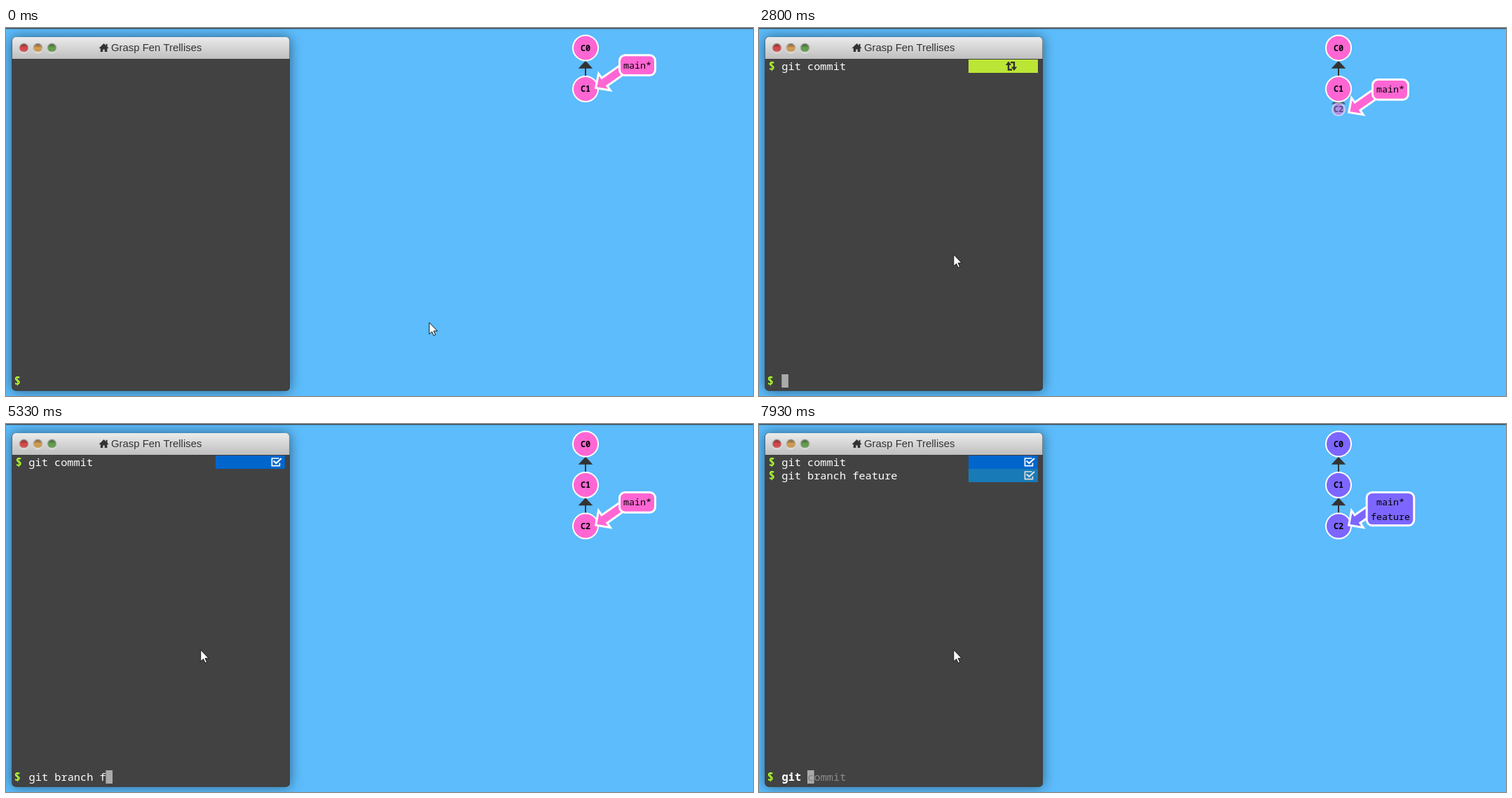
Animation, 1066 px wide and 525 px high, one loop 8 s. Source, as an HTML page with a canvas:

```html
<!DOCTYPE html>
<html lang="en">
<head>
<meta charset="utf-8">
<style>
html, body { margin: 0; width: 100%; height: 100%; overflow: hidden; background: #5cbcfc; }
canvas { display: block; }
</style>
</head>
<body>
<canvas id="stage" width="1066" height="525"></canvas>
<script>
const ctx = document.getElementById('stage').getContext('2d');
const LOOP = 8000, FPS = 15, CHAR = 9.18, SPACING = 58.6;
const MONO = '"Noto Sans Mono", monospace';
const DARK = [51, 51, 51], WHITE = [255, 255, 255], PINK = [255, 102, 211], PURPLE = [124, 102, 255];
const YELLOW = [235, 231, 40], GREEN = [149, 230, 64], BLUE = [0, 102, 204];

// Bursts of typing: text, time of first and last key
const commands = [
  { enter: 2200, start: 2570, done: 3500,
    bursts: [['git co', 1130, 1470], ['m', 1670], ['mit', 1870, 1930]] },
  { enter: 6470, start: 6840, done: 7490,
    bursts: [['git ', 3270, 3465], ['branch ', 4330, 5070], ['f', 5330], ['ea', 5470, 5470], ['ture', 5670, 5930]] },
  { enter: LOOP, bursts: [['git ', 7530, 7725]] },
];
const hints = ['git commit', 'git branch'];

const clamp = x => Math.max(0, Math.min(1, x));
const lerp = (a, b, p) => a + (b - a) * p;
const mix = (a, b, p) => a.map((v, i) => lerp(v, b[i], p));
const rgb = c => `rgb(${c.map(Math.round)})`;
const smooth = x => (x = clamp(x), x * x * (3 - 2 * x));
const ease = x => 1 - (1 - clamp(x)) ** 2.3;

// Each hop is a parabola centred on `mid`, touching the ground at 1
function bounce(x) {
  x = clamp(x) * 2.75;
  if (x < 1) return x * x;
  const [mid, half] = x < 2 ? [1.5, .5] : x < 2.5 ? [2.25, .25] : [2.625, .125];
  return 1 - half * half + (x - mid) ** 2;
}

function typedAt(t, bursts) {
  return bursts.map(([str, first, last]) =>
    [...str].filter((_, i) => t >= (i ? lerp(first, last, i / (str.length - 1)) : first)).join('')).join('');
}

function text(str, x, y, size, color, weight = 500, align = 'left', family = MONO) {
  ctx.font = `${weight} ${size}px ${family}`;
  ctx.fillStyle = color;
  ctx.textAlign = align;
  ctx.fillText(str, x, y);
}
function fill(color) {
  ctx.fillStyle = color;
  ctx.fill();
}
function stroke(color, width) {
  ctx.strokeStyle = color;
  ctx.lineWidth = width;
  ctx.stroke();
}
function path(...points) {
  ctx.beginPath();
  points.forEach(([x, y]) => ctx.lineTo(x, y));
}
function polygon(color, ...points) {
  path(...points);
  ctx.closePath();
  fill(color);
}
function box(x, y, w, h, r) {
  ctx.beginPath();
  ctx.roundRect(x, y, w, h, r);
}
function disc(x, y, r, color) {
  ctx.beginPath();
  ctx.arc(x, y, r, 0, 7);
  fill(color);
}
function rect(x, y, w, h, color) {
  ctx.fillStyle = color;
  ctx.fillRect(x, y, w, h);
}
function vertical(y0, y1, ...colors) {
  const g = ctx.createLinearGradient(0, y0, 0, y1);
  colors.forEach((c, i) => g.addColorStop(i / (colors.length - 1), c));
  return g;
}

function drawWindow() {
  rect(0, 0, 1066, 525, '#5cbcfc');
  rect(0, 0, 1066, 1.3, '#434a4f');
  ctx.save();
  ctx.shadowColor = 'rgba(0,0,0,.5)';
  ctx.shadowBlur = 17;
  box(8.5, 13, 396.5, 504.5, 5);
  fill('#424242');
  ctx.restore();
  box(9, 44, 395.5, 473, [0, 0, 5, 5]);
  stroke('#383838', 1);
  box(9, 13, 395.5, 31, [5, 5, 0, 0]);
  fill(vertical(13, 44, '#ebebeb', '#bfbfbf'));

  ['#e04b4c', '#dca355', '#69a551'].forEach((color, i) => {
    const x = 25.5 + 20 * i;
    disc(x, 29, 7.2, vertical(22, 36, '#858585', '#f0f0f0'));
    disc(x, 29, 5.8, color);
    disc(x, 29, 5.8, vertical(23, 35, 'rgba(0,0,0,.4)', 'rgba(0,0,0,0)', 'rgba(255,255,255,.5)'));
  });

  // House icon
  polygon('#333', [132.5, 29], [139.6, 22], [146.7, 29]);
  rect(142.6, 22.8, 2, 4, '#333');
  rect(134.8, 28, 9.6, 6, '#333');
  rect(138.3, 30.5, 2.5, 3.5, '#cfcfcf');
  text('Grasp Fen Trellises', 150, 33.2, 14.9, '#333', 400, 'left', '"Liberation Sans", Arial, sans-serif');
}

const icons = {
  square(color) {
    box(328, 4, 11.5, 10.5, 2);
    stroke(color, 1.8);
  },
  // Two bent arrows, one the other turned by half a circle
  swap(color) {
    ctx.translate(360, 9.3);
    for (let i = 0; i < 2; i++) {
      path([-4, -2], [-4, 5.2], [1, 5.2]);
      stroke(color, 2.4);
      polygon(color, [-4, -6.8], [.2, -1.3], [-8.2, -1.3]);
      ctx.rotate(Math.PI);
    }
  },
  check(color) {
    path([389.5, 4], [379.5, 4], [379.5, 14.7], [390.5, 14.7], [390.5, 10.5]);
    stroke(color, 1.7);
    path([381.8, 7.5], [385.5, 11], [393, 4]);
    stroke(color, 2.3);
  },
};

function drawRow({ bursts, enter, start, done }, index, t) {
  if (t < enter || enter === LOOP) return;
  const finish = ease((t - done) / 800);
  const icon = t < start ? 'square' : t < done ? 'swap' : 'check';
  ctx.save();
  ctx.translate(0, 45 + 19 * index);
  ctx.lineJoin = 'miter';
  text('$', 13.7, 15, 15.3, '#adff2f', 'bold');
  text(typedAt(t, bursts), 32.3, 15, 15.3, '#fff');
  rect(299, 0, 99, 19, rgb(mix(mix(YELLOW, GREEN, ease((t - start) / 800)), BLUE, finish)));
  icons[icon](rgb(mix(DARK, WHITE, finish)));
  ctx.restore();
}

function drawPrompt(t) {
  const typed = typedAt(t, commands.find(c => t < c.enter).bursts);
  const hint = typed && hints.find(h => h.startsWith(typed)) || '';
  const x = 32.6 + CHAR * typed.length, y = 509.3;
  text('$', 11.7, y, 15.3, '#adff2f', 'bold');
  text(hint, 32.6, y, 15.3, '#8a8a8a');
  if (t >= 400) rect(x - .3, 494, 9.6, 19, '#aaa');
  text(hint.charAt(typed.length), x, y, 15.3, '#808080');
  text(typed, 32.6, y, 15.3, '#fff', hint ? 600 : 500);
}

function drawEdge(apex, end) {
  const base = apex + 11;
  path([827, base - 2], [827, Math.max(end, base)]);
  stroke('#333', 2);
  polygon('#333', [827, apex], [837.3, base], [816.7, base]);
}
function drawCommit(name, y, r, color) {
  disc(827, y, r, color);
  stroke('#fff', 2);
  text(name, 827, y + 4.2, 11.8, '#000', 'bold', 'center');
}

function drawLabel(t, color) {
  const split = smooth((t - 6835) / 400);
  ctx.save();
  ctx.lineJoin = 'miter';

  // Pointer to the commit: one side of the arrow, mirrored on its axis
  const side = [[15, 14.7], [15, 6.8], [45, 6.8]];
  ctx.translate(841.7, 85.6);
  ctx.rotate(-35 * Math.PI / 180);
  polygon(color, [0, 0], ...side, ...side.map(([x, y]) => [x, -y]).reverse());
  stroke('#fff', 3);
  ctx.restore();

  const half = lerp(25.5, 33.8, split);
  box(901 - half, 38.8, 2 * half, lerp(28.8, 47.4, split), 8);
  fill(color);
  stroke('#fff', 3);
  text('main*', 901, 57.6, 13.4, '#000', 400, 'center');
  if (t >= 6870) text('feature', 901, 57.6 + 20.5 * split, 13.4, '#000', 400, 'center');
}

function drawTree(t) {
  const born = bounce((t - 2595) / 800);
  const moved = smooth((t - 2575) / 400);
  const color = rgb(mix(PINK, PURPLE, smooth((t - 6815) / 400)));
  const top = 28.4, parent = top + SPACING, child = parent + SPACING * born;

  drawEdge(46.7, parent - 18);
  ctx.globalAlpha = moved;
  if (moved) drawEdge(lerp(parent, 46.7 + SPACING, moved), child - 18 * born);
  ctx.globalAlpha = 1;
  drawCommit('C0', top, 18, color);
  drawCommit('C1', parent, 18, color);
  ctx.globalAlpha = born;
  if (born) drawCommit('C2', child, 18 * born, color);
  ctx.globalAlpha = 1;

  ctx.save();
  ctx.translate(0, SPACING * moved);
  drawLabel(t, color);
  ctx.restore();
}

function drawPointer(t) {
  const p = smooth(t / 200);
  ctx.save();
  ctx.translate(lerp(604, 277.8, p), lerp(420.2, t < 4600 ? 323.2 : 322.2, p));
  ctx.lineJoin = 'round';
  polygon('#fff', [0, 0], [0, 16.6], [3.8, 13], [6.4, 18.6], [8.9, 17.5], [6.3, 12], [11.5, 12]);
  stroke('#111', 1);
  ctx.restore();
}

function render(now) {
  const step = Math.floor((now % LOOP) * FPS / 1000 + .1) % (LOOP * FPS / 1000);
  const t = Math.round(step * 100 / FPS) * 10;
  drawWindow();
  commands.forEach((command, i) => drawRow(command, i, t));
  drawPrompt(t);
  drawTree(t);
  drawPointer(t);
}

let origin;
function loop(now) {
  origin ??= now;
  render(now - origin);
  requestAnimationFrame(loop);
}
render(0);
requestAnimationFrame(loop);
</script>
</body>
</html>
```
